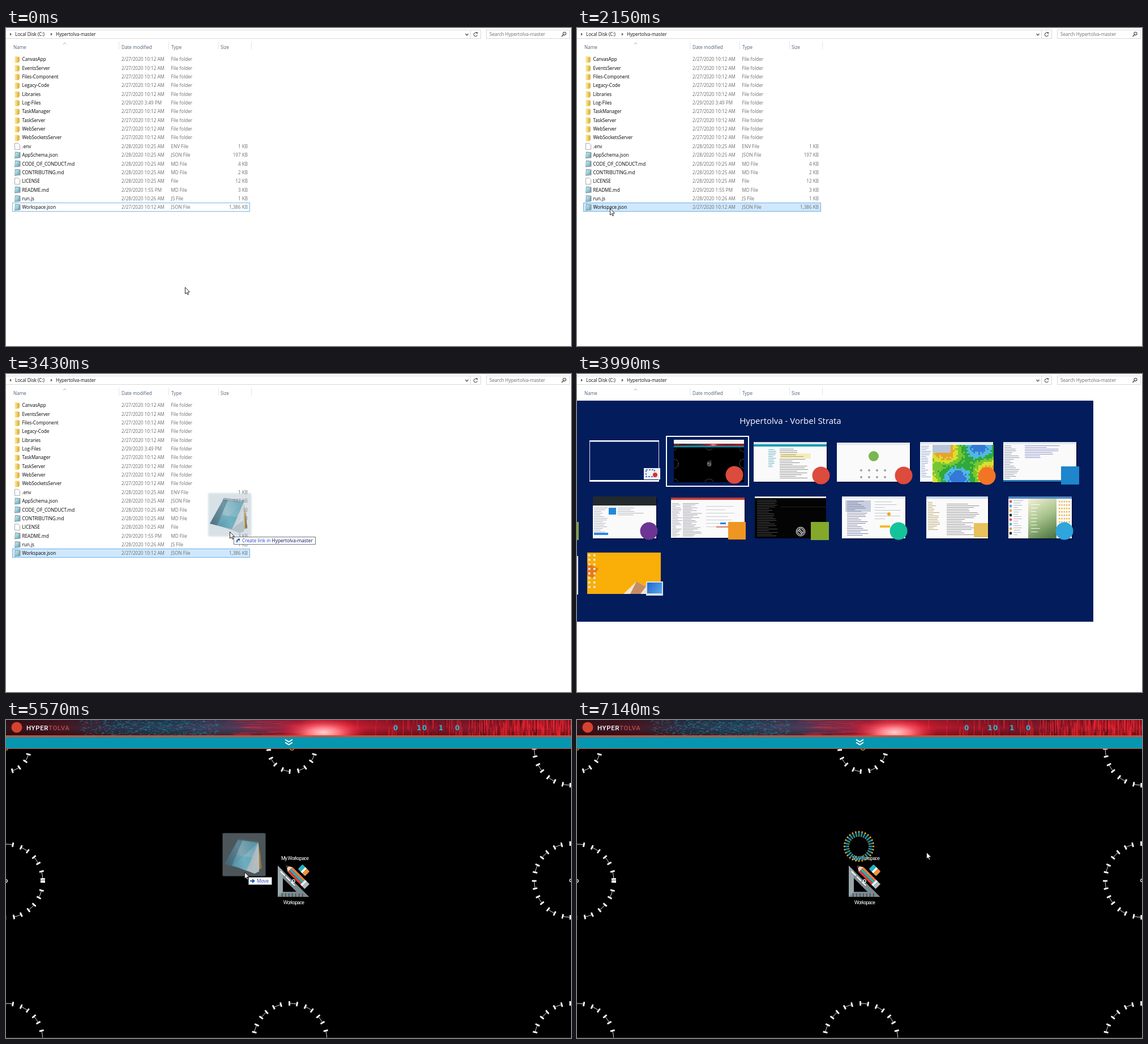
Recreate the animation shown at these times as an HTML page with a canvas. Size 998 px wide and 561 px high, loop 8000 ms.

```html
<!DOCTYPE html>
<html lang="en">
<head>
<meta charset="utf-8">
<title>Dragging a file into the workspace</title>
<style>
html, body { margin: 0; width: 100%; height: 100%; overflow: hidden; background: #fff; }
canvas { display: block; }
</style>
</head>
<body>
<canvas id="stage" width="998" height="561"></canvas>
<script>
const g = document.getElementById('stage').getContext('2d');
const LOOP = 8000, TAU = Math.PI * 2, PROJECT = 'Hypertolva';
const UI = '"Open Sans", "Noto Sans", sans-serif';

// Pointer tip: time, x, y (held until the next entry)
const POINTER = [
  [0, 316, 457], [1000, 299, 450], [1160, 173, 413], [1300, 115, 373], [1460, 66, 333],
  [1610, 60, 322], [1730, 58, 320], [1870, 58, 318], [2610, 79, 329], [2760, 160, 337],
  [2880, 257, 327], [3030, 330, 300], [3150, 393, 280], [3300, 394, 279], [3430, 395, 278],
  [5570, 421, 268], [5760, 448, 246], [5900, 473, 232], [6050, 485, 226], [6170, 494, 223],
  [6320, 497, 223], [6440, 498, 223], [6870, 540, 228], [6990, 584, 232], [7140, 617, 233]
];

const D27 = '2/27/2020 10:12 AM', D28 = '2/28/2020 10:25 AM';
const FILES = [
  ...['CanvasApp', 'EventsServer', 'Files-Component', 'Legacy-Code', 'Libraries', 'Log-Files',
    'TaskManager', 'TaskServer', 'WebServer', 'WebSocketsServer']
    .map(n => [n, n === 'Log-Files' ? '2/29/2020 3:49 PM' : D27, 'File folder', '']),
  ['.env', D28, 'ENV File', '1 KB'],
  ['AppSchema.json', D28, 'JSON File', '197 KB'],
  ['CODE_OF_CONDUCT.md', D28, 'MD File', '4 KB'],
  ['CONTRIBUTING.md', D28, 'MD File', '2 KB'],
  ['LICENSE', D28, 'File', '12 KB'],
  ['README.md', '2/29/2020 1:55 PM', 'MD File', '3 KB'],
  ['run.js', '2/28/2020 10:26 AM', 'JS File', '1 KB'],
  ['Workspace.json', D27, 'JSON File', '1,386 KB']
];

const hash = n => { const v = Math.sin(n * 12.9898) * 43758.5453; return v - Math.floor(v); };

function rect(x, y, w, h, color) { g.fillStyle = color; g.fillRect(x, y, w, h); }
function frame(x, y, w, h, color, width = 1) {
  g.strokeStyle = color; g.lineWidth = width; g.strokeRect(x, y, w, h);
}
function trace(points, close) {
  g.beginPath();
  for (let i = 0; i < points.length; i += 2) g.lineTo(points[i], points[i + 1]);
  if (close) g.closePath();
}
function poly(color, ...points) { trace(points, true); g.fillStyle = color; g.fill(); }
function line(color, width, ...points) {
  trace(points); g.strokeStyle = color; g.lineWidth = width; g.stroke();
}
function disc(x, y, r, color) { g.beginPath(); g.arc(x, y, r, 0, TAU); g.fillStyle = color; g.fill(); }
function ring(x, y, r, color, width, from = 0, to = TAU) {
  g.beginPath(); g.arc(x, y, r, from, to); g.strokeStyle = color; g.lineWidth = width; g.stroke();
}
function text(s, x, y, color, { size = 8.15, family = UI, align = 'left', spacing = 0, weight = 400 } = {}) {
  g.font = `${weight} ${size}px ${family}`;
  g.textAlign = align;
  g.letterSpacing = spacing + 'px';
  g.fillStyle = color;
  g.fillText(s, x, y);
}
function gradient(x0, y0, x1, y1, ...stops) {
  const fill = g.createLinearGradient(x0, y0, x1, y1);
  stops.forEach((c, i) => fill.addColorStop(i / (stops.length - 1), c));
  return fill;
}
function at(x, y, draw, angle = 0, scale = 1) {
  g.save(); g.translate(x, y); g.rotate(angle); g.scale(scale, scale); draw(); g.restore();
}

function chrome() {
  rect(0, 0, 998, 561, '#fff');
  line('#d9d9d9', 1, 0, 3.5, 838.5, 3.5, 838.5, 18.5, 0, 18.5);
  line('#d9d9d9', 1, 820.5, 4, 820.5, 18);
  frame(848.5, 3.5, 147, 15, '#d9d9d9');
  for (const x of [7, 79]) poly('#555', x, 8.5, x + 3, 11, x, 13.5);
  text('Local Disk (C:)', 16, 14, '#111');
  text(PROJECT + '-master', 88, 14, '#111');
  text(`Search ${PROJECT}-master`, 854, 14, '#6d6d6d');
  line('#555', 1.3, 811.5, 10, 814, 13, 816.5, 10);
  ring(829.5, 11.5, 3.2, '#555', 1.1, 0.3, 5.4);
  poly('#555', 830, 7, 833.5, 7.5, 832.5, 11);
  ring(986.5, 9.8, 2.6, '#444', 1.1);
  line('#444', 1.4, 984.5, 12, 981.5, 15);
  [['Name', 13], ['Date modified', 204], ['Type', 292], ['Size', 379]]
    .forEach(([s, x]) => text(s, x, 37.2, '#4c607a'));
  for (const x of [199.5, 287.5, 375.5, 433.5]) line('#e5e5e5', 1, x, 24, x, 38);
  line('#6ea5cf', 1, 101, 28.5, 103.5, 26, 106, 28.5);
}

function fileIcon(row, y) {
  if (row < 10) {
    rect(15, y - 5, 8, 11, '#f3d675');
    rect(15, y - 5, 2, 11, '#fbeeb4');
    poly('#dfb84f', 20, y - 3, 24, y - 4, 24, y + 4, 20, y + 6);
  } else if (row === 10 || row === 14) {
    rect(15, y - 5.5, 10, 12, '#fff');
    trace([15.5, y - 5.5, 21.5, y - 5.5, 24.5, y - 2.5, 24.5, y + 5.5, 15.5, y + 5.5], true);
    g.strokeStyle = '#a8a8a8'; g.lineWidth = 1; g.stroke();
  } else {
    poly('#8b9ca4', 16, y - 6, 25.5, y - 5, 25.5, y + 5, 15, y + 6);
    poly(gradient(15, y - 5, 24, y + 5, '#d3eff4', '#58b2c6'), 17, y - 4.5, 23.5, y - 4, 22, y + 4, 15.5, y + 4.5);
  }
}

function explorer(t) {
  chrome();
  const hover = t >= 1610, selected = t >= 2150;
  if (hover) rect(11, 308, 420, 16, selected ? '#d0e8fd' : '#e5f3fb');
  frame(11.5, 308.5, 419, 15, selected ? '#6fb0e4' : '#74b7e3');
  FILES.forEach(([name, date, type, size], i) => {
    const y = 55.3 + i * 15.35, base = y + 3;
    fileIcon(i, y);
    text(name, 28.5, base, '#000');
    text(date, 204, base, '#6d6d6d');
    text(type, 291.5, base, '#6d6d6d');
    text(size, 427, base, '#6d6d6d', { align: 'right' });
  });
}

// Rows of short strokes that read as small text
function scribble(x, y, w, h, color, step = 3) {
  for (let i = 0; i * step < h; i++) rect(x, y + i * step, w * (0.35 + 0.65 * hash(i + x)), 0.9, color);
}

function paper(x, y, w, h, top = '#e4e8ee') {
  rect(x + 2, y + 2, w, h, '#00103c');
  rect(x, y, w, h, '#fafafa');
  rect(x, y, w, 4, top);
}

function weatherMap() {
  paper(606, 120, 129, 70);
  scribble(608, 127, 18, 55, '#8aa0d0');
  const tones = ['#3478d8', '#52b8e0', '#2fa83c', '#77c732', '#d8df2d', '#e9a32c'];
  for (let x = 0; x < 106; x += 3) for (let y = 0; y < 64; y += 3) {
    const v = 2.6 + 1.7 * Math.sin(x / 17 + y / 26) + 1.2 * Math.cos(y / 12 - x / 25) + hash(x * 71 + y) * 0.9;
    rect(628 + x, 125 + y, 3, 3, tones[Math.max(0, Math.min(5, Math.floor(v)))]);
  }
  rect(628, 125, 32, 14, '#b8c4dc');
}

function switcher(t) {
  const late = t >= 3720;
  rect(0, 47, 912, 390, '#021c5c');
  text(late ? PROJECT + ' - Vorbel Strata' : 'Screen Recorder - Capture Area 1396 x 785', 377, 88, '#fff',
    { size: 15, align: 'center' });

  frame(22.5, 117.5, 122, 72, '#dfe6f4');
  rect(22, 117, 123, 2.5, '#fff');
  rect(22, 187, 123, 3, '#fff');
  rect(171, 116, 124, 75, '#f2f2f2');
  g.save();
  g.beginPath(); g.rect(171, 123, 124, 68); g.clip();
  at(171, 123, page, 0, 0.1243);
  g.restore();

  paper(312, 120, 129, 70, '#dde3e8');
  rect(312, 124, 129, 4, '#159bb0');
  scribble(338, 133, 15, 32, '#56a9bb');
  scribble(358, 132, 52, 53, '#888');
  rect(358, 140, 55, 9, '#f4edbd');
  scribble(360, 142, 45, 6, '#a89a55');

  paper(459, 121, 129, 69);
  disc(524, 145, 9, '#79b651');
  for (let i = 0; i < 8; i++) disc(502 + i % 4 * 14, 170 + (i >> 2) * 12, 2, '#9aa0ab');

  weatherMap();
  paper(753, 120, 129, 70);
  scribble(755, 126, 27, 58, '#8995a6');
  scribble(791, 126, 62, 22, '#8187c3');
  rect(753, 187, 129, 3, '#2478bb');

  paper(28, 216, 112, 74);
  rect(28, 216, 112, 16, '#24292e');
  scribble(30, 236, 24, 44, '#a6acb4');
  rect(56, 236, 13, 12, '#2188d8');
  scribble(72, 236, 62, 15, '#a9b1b9');
  rect(30, 280, 25, 4, '#2f83e5');

  paper(166, 218, 130, 71, '#c23c37');
  scribble(168, 228, 18, 58, '#a6a6b0', 2.5);
  scribble(187, 228, 34, 58, '#9c9ca8', 2.5);
  scribble(228, 233, 55, 38, '#c4c8ce', 6);
  rect(253, 262, 10, 3, '#2188d8');
  rect(246, 269, 34, 1.5, '#d8483d');

  rect(314, 216, 126, 74, '#040404');
  rect(314, 216, 126, 3, '#e5e5e5');
  scribble(318, 222, 37, 66, '#555', 3);
  rect(360, 234, 80, 1, '#222');

  paper(468, 216, 112, 74);
  rect(474, 223, 45, 20, '#c9cfe0');
  scribble(477, 224, 38, 62, '#7179a0', 3);
  scribble(526, 225, 48, 34, '#bcc1c8', 5);
  disc(551, 247, 3, '#f5a623');
  rect(535, 267, 18, 4, '#f6b92e');

  paper(617, 216, 109, 74, '#c7d8ea');
  scribble(620, 226, 21, 50, '#b39c60');
  scribble(653, 229, 60, 56, '#888');

  paper(762, 216, 112, 74, '#5288c1');
  for (let i = 0; i < 8; i++) disc(766, 225 + i * 8, 2.4, ['#d95b52', '#57a8d9', '#e8a23a', '#222'][i % 4]);
  scribble(771, 223, 20, 63, '#a9b2bb', 4);
  rect(797, 220, 50, 70, gradient(797, 220, 835, 290, '#f5efd6', '#a9c58d', '#537a45'));
  scribble(802, 230, 16, 52, '#fff', 6);
  for (let i = 0; i < 40; i++) rect(851 + i % 5 * 4.3, 224 + Math.floor(i / 5) * 6, 2.4, 2.4, '#efb03b');

  rect(0, 321, 2, 68, '#e8e8e8');
  rect(18, 315, 130, 73, '#f9ae08');
  poly('#e77817', 18, 334, 38, 343, 28, 360, 18, 355);
  poly('#f3e6cf', 82, 388, 105, 366, 148, 388);
  poly('#c68c64', 105, 366, 122, 375, 112, 388, 94, 388);
  for (let i = 0; i < 16; i++) rect(20 + (i >> 3) * 9, 318 + i % 8 * 8, 3.5, 3.5, '#e8edf4');

  [[278, 178, '#dd4b3c'], [431, 179, '#dd4b3c'], [577, 179, '#dd4b3c'], [724, 180, '#f27525'],
    [127, 277, '#6c3593'], [568, 277, '#15c39a'], [861, 277, '#2fa5dd']]
    .forEach(([x, y, c]) => disc(x, y, 15.5, c));
  [[855, 163, 32, '#1d86cc'], [267, 261, 31, '#ef9622'], [413, 261, 32, '#84a92a'], [701, 263, 25, '#e8c15d'], [-29, 261, 32, '#84a92a']]
    .forEach(([x, y, s, c]) => rect(x, y, s, s, c));
  rect(118, 166, 29, 20, '#f1f1f1');
  g.setLineDash([3, 2]); frame(122, 169, 15, 12, '#224fc2', 1.5); g.setLineDash([]);
  disc(138, 178, 4, '#d9312b');
  rect(122, 366, 30, 25, '#d8dfe5');
  rect(124, 368, 26, 19, gradient(124, 368, 150, 387, '#2064cd', '#5aabed'));
  frame(late ? 158 : 11, 110, 145, 88, '#fff', 2);

  ring(395, 278, 6.5, '#fff', 3.5);
  line('#fff', 3.5, 391, 274, 399, 282);
  ring(395, 278, 6.5, '#222', 1.5);
  line('#222', 1.5, 391, 274, 399, 282);
}

function banner() {
  rect(0, 0, 998, 27, gradient(0, 0, 998, 0, '#33121c', '#4a1824', '#27364c', '#24425a', '#4d3c5a',
    '#a82440', '#d01e34', '#981628', '#85182a', '#a81826', '#a01826'));
  rect(0, 0, 998, 27, gradient(0, 0, 0, 27, 'rgba(0,0,0,.18)', 'rgba(0,0,0,0)', 'rgba(0,0,0,.3)'));
  for (let i = 0; i < 520; i++) {
    const x = 130 + 245 * hash(i + 1), y = 27 * hash(i + 900);
    rect(x, y, 1 + 4 * hash(i + 50), 0.9, i % 4 ? 'rgba(38,145,175,.6)' : 'rgba(180,46,67,.5)');
  }
  for (let i = 0; i < 260; i++) {
    const x = 610 + 388 * Math.sqrt(hash(i + 300)), h = 4 + 21 * hash(i + 700);
    rect(x, i % 2 ? 0 : 27 - h, 1, h, i % 5 ? 'rgba(255,42,56,.65)' : 'rgba(40,10,20,.5)');
  }
  for (let i = 0; i < 60; i++) rect(385 + 200 * hash(i + 40), 27 * hash(i + 80), 30, 0.8, 'rgba(235,45,65,.4)');
  const glow = g.createRadialGradient(0, 0, 0, 0, 0, 75);
  glow.addColorStop(0, '#ffd3d3'); glow.addColorStop(0.35, '#ff7a84'); glow.addColorStop(1, 'rgba(245,25,45,0)');
  g.save();
  g.beginPath(); g.rect(0, 0, 998, 27); g.clip();
  g.translate(561, 22); g.scale(1, 0.35);
  disc(0, 0, 75, glow);
  g.restore();
  [['0', 689], ['10', 735], ['1', 769], ['0', 798]].forEach(([s, x]) =>
    text(s, x, 18, '#29b8cf', { size: 12, weight: 700, align: 'center', spacing: 1.5, family: '"DejaVu Sans", sans-serif' }));
  disc(19, 13, 9.5, '#d5432f');
  const logo = { size: 11.5, weight: 500, spacing: 0.6, family: 'Roboto, sans-serif' };
  text(PROJECT.slice(0, 5).toUpperCase(), 36, 18, '#fff', logo);
  text(PROJECT.slice(5).toUpperCase(), 75, 18, '#b04c52', logo);
}

// Dashes of fixed length run clockwise from the right, each with a bar at both ends
function gauge(x, y, r) {
  const pitch = 28.8 / r, dash = 13.6 / r;
  for (let a = 0.26 - pitch; a + dash < TAU; a += pitch) {
    const from = Math.max(0, a), to = a + dash;
    if (to < 0) continue;
    ring(x, y, r, '#ddd', 1, from, to);
    for (const end of [from, to]) at(x, y, () => rect(r - 4, -1.4, 8, 2.8, '#fff'), end);
  }
}

function workspaceIcon() {
  const label = { size: 8.8, align: 'center', spacing: -0.8, family: 'Roboto, sans-serif' };
  text('My Workspace', 510, 247, '#fff', label);
  text('Workspace', 508, 324.5, '#fff', label);
  poly('#7b8a8f', 480, 257, 535.5, 312, 480, 312);
  poly('#9aa7ab', 480, 257, 489, 266, 489, 303, 480, 312);
  poly('#000', 489, 279, 513, 303, 489, 303);
  for (let x = 487; x < 526; x += 6) rect(x, 306, 1.4, 6, '#3a474c');
  g.setLineDash([11, 2]); line('#fff', 2, 485, 267, 510, 292); g.setLineDash([]);
  at(495, 257, () => {
    poly('#f6caa0', 0, 0, 10, -6, 10, 6);
    poly('#34424b', 0, 0, 4, -2.4, 4, 2.4);
    rect(10, -6, 31, 4, '#f47b3c');
    rect(10, -2, 31, 4, '#20b1c4');
    rect(10, 2, 31, 4, '#e6412f');
    rect(41, -6, 5, 12, '#e8ecee');
    rect(46, -6, 6, 12, '#b3bec3');
  }, TAU / 8);
  at(526, 265, () => {
    g.beginPath(); g.roundRect(-9, -6, 18, 12, 2); g.clip();
    rect(-9, -6, 7, 12, '#22b2c5');
    rect(-2, -6, 4, 12, '#fff');
    rect(2, -6, 7, 12, '#f69339');
  }, TAU / 8);
  ring(508, 284, 2.4, '#fff', 1.2);
}

function page() {
  rect(0, 0, 998, 561, '#000');
  [[0, 50, 41], [505, 50, 41], [998, 50, 65], [0, 284, 65], [998, 283, 65], [0, 565, 65], [502, 565, 65], [998, 565, 65]]
    .forEach(c => gauge(...c));
  ring(0, 284, 2.4, '#fff', 1.2);
  ring(998, 283, 2.4, '#fff', 1.2);
  for (const x of [0, 505]) ring(x, 50, 3.2, '#e3c12d', 1.2);
  banner();
  rect(0, 27, 998, 3, '#e0492f');
  rect(0, 30, 998, 20, '#0696b0');
  rect(0, 50, 998, 1, '#d8492f');
  for (const y of [34.5, 39.5]) line('#fff', 2, 493, y, 499.5, y + 4, 506, y);
  rect(0, 560, 998, 1, '#292929');
  workspaceIcon();
}

function spinner() {
  for (let i = 0; i < 28; i++) at(498, 223, () => {
    rect(17.5, -1.4, 7.5, 2.8, '#168aa0');
    rect(17, -0.7, 2, 1.4, '#a97b27');
    rect(24.6, -1.3, 2.6, 2.6, '#e5a526');
  }, i * TAU / 28);
}

function notepad() {
  poly('#b09254', 25, -50, 31, -7, 24, -3);
  poly('#7d683f', 28, -40, 31, -7, 28, -6);
  poly(gradient(-20, -10, 26, 0, '#93aab3', '#dbe4e7'), -20, -11, 18, 3, 26, -1, 25, -52);
  poly('#aebcc2', 4, -4, 18, 3, 26, -1, 24, -20);
  poly(gradient(-30, -20, 20, -40, '#547b8c', '#8fbbc7', '#5fa5b8'), -11, -57, 25, -52, 4, -4, -35, -14);
  poly('rgba(50,90,108,.55)', -11, -57, -3, -56, -22, -11, -35, -14);
  poly('rgba(65,160,184,.55)', -14, -29, 14, -26, 4, -4, -22, -11);
  for (let i = 0; i < 12; i++) ring(-9 + i * 3.1, -57 + i * 0.42, 2, '#59656a', 0.9, 2, 6.1);
}

function ghost(x, y) {
  at(x, y, () => {
    g.save();
    g.beginPath(); g.roundRect(-38.5, -68.5, 76, 76, 2);
    g.shadowColor = 'rgba(0,0,0,.35)'; g.shadowBlur = 3; g.shadowOffsetX = g.shadowOffsetY = 1;
    g.fillStyle = 'rgba(205,230,245,.37)'; g.fill();
    g.restore();
    g.globalAlpha = 0.8;
    notepad();
  });
}

function dropLabel(x, y, parts, width) {
  rect(x + 7, y + 9, width, 14, '#777');
  rect(x + 8, y + 10, width - 2, 12, '#fff');
  const link = parts.length > 1, ax = x + 10, ay = y + 16;
  if (link) {
    rect(ax + 1, ay - 4, 8, 8, '#e5edf8');
    line('#164fae', 1.6, ax + 3, ay + 3, ax + 3, ay, ax + 6, ay - 2);
    poly('#164fae', ax + 4, ay - 3.5, ax + 8, ay - 3.5, ax + 8, ay + 0.5);
  } else {
    line('#1659c4', 2, ax, ay, ax + 6, ay);
    poly('#1659c4', ax + 4, ay - 4, ax + 9, ay, ax + 4, ay + 4);
  }
  text(parts[0], x + 22, y + 19, '#2544c9', { size: 8.3 });
  if (link) text(parts[1], x + 22 + g.measureText(parts[0]).width, y + 19, '#07136b', { size: 8.3 });
}

function arrow(x, y) {
  at(x, y, () => {
    trace([0.5, 0.5, 0.5, 12, 3, 9.7, 4.9, 13.6, 6.6, 12.8, 4.8, 9, 8.4, 8.7], true);
    g.fillStyle = '#fff'; g.fill();
    g.strokeStyle = '#111'; g.lineWidth = 0.9; g.stroke();
  });
}

function render(t) {
  const [, x, y] = POINTER.findLast(p => p[0] <= t);
  const switching = t >= 3570 && t < 4120, onPage = t >= 4120;
  if (switching) { chrome(); switcher(t); return; }
  if (onPage) page(); else explorer(t);
  if (t >= 6870) spinner();
  if (t >= 2610 && t < 6720) ghost(x, y);
  if (t >= 3300 && t < 6720) {
    if (onPage) dropLabel(x, y, ['Move'], 42);
    else dropLabel(x, y, ['Create link in ', PROJECT + '-master'], 145);
  }
  arrow(x, y);
}

const start = performance.now();
function tick() {
  render((performance.now() - start) % LOOP);
  requestAnimationFrame(tick);
}
tick();
</script>
</body>
</html>
```
